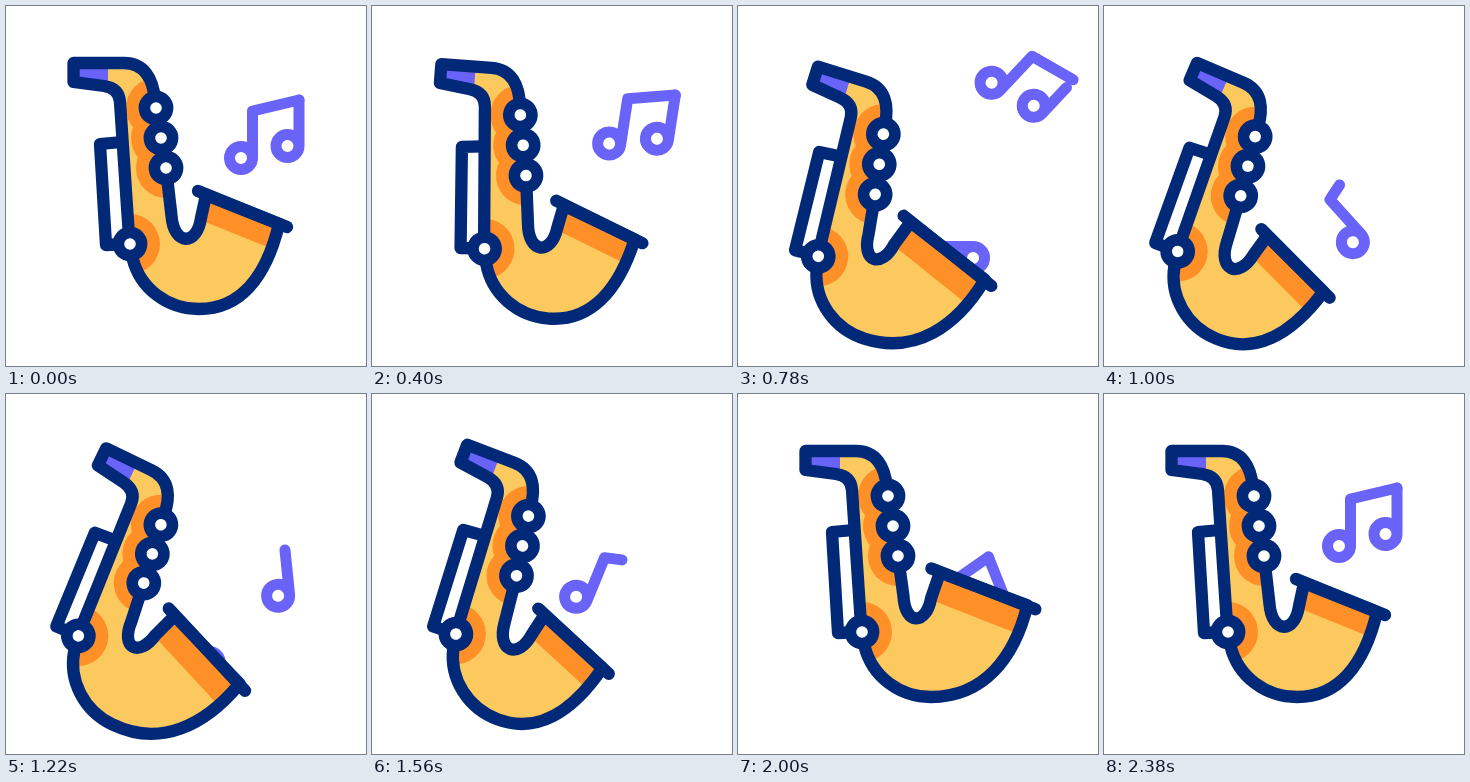
Recreate the animation shown at these times as an HTML page with a canvas. Size 360x360 px, loop 2.4 s.

```html
<!DOCTYPE html>
<html lang="en">
<head>
<meta charset="utf-8">
<title>Saxophone</title>
<style>
html, body { margin: 0; width: 100%; height: 100%; overflow: hidden; background: #fff; }
canvas { display: block; width: 360px; height: 360px; }
</style>
</head>
<body>
<canvas id="stage" width="360" height="360"></canvas>
<script>
const LOOP = 2400, LINE = 12.3;
const NAVY = '#022878', YELLOW = '#fcc95f', ORANGE = '#ff8f27', PURPLE = '#6a63f7';
const PIVOT = { x: 89.7, y: 127 };
const KEYS = [[150, 102], [155, 132], [160, 162], [124, 238]];
const ctx = document.getElementById('stage').getContext('2d');
const TAU = Math.PI * 2;

// Each single note passes through three poses: x, y, angle
const SINGLES = [
  { times: [780, 1220, 1400], poses: [[235, 252, -90], [272, 202, -6], [298, 160, 15]], fade: 1190 },
  { times: [1220, 1560, 1830], poses: [[203, 269, -110], [204, 203, 22], [270, 150, 50]], fade: 1600 }
];

const ramp = (t, a, b) => Math.min(1, Math.max(0, (t - a) / (b - a)));
const ease = (t, a, b) => (1 - Math.cos(Math.PI * ramp(t, a, b))) / 2;
const bump = (t, a, b) => Math.sin(Math.PI * ramp(t, a, b)) ** 2;

// Parabola through three moments
function parabola([a, b, c], [p, q, r], t) {
  return p * (t - b) * (t - c) / ((a - b) * (a - c))
       + q * (t - a) * (t - c) / ((b - a) * (b - c))
       + r * (t - a) * (t - b) / ((c - a) * (c - b));
}

// The bell swells as each note leaves it
const puff = t => Math.min(1, 1.15 * Math.max(
  ...[770, 1200, 1940].map(peak => bump(t, peak - 230, peak + 230))));

function place(x, y, angle) {
  ctx.translate(x, y);
  ctx.rotate(angle * Math.PI / 180);
}

function disc(x, y, r, color) {
  ctx.fillStyle = color;
  ctx.beginPath();
  ctx.arc(x, y, r, 0, TAU);
  ctx.fill();
}

function line(points, color, width) {
  ctx.strokeStyle = color;
  ctx.lineWidth = width;
  ctx.beginPath();
  points.forEach(([x, y]) => ctx.lineTo(x, y));
  ctx.stroke();
}

// Ring, stem and optional flag as one line that is shown up to a share
function note(x, y, stem, flagX, flagY, share) {
  if (share <= 0) return;
  const r = 11.5, length = TAU * r + stem + Math.hypot(flagX, flagY);
  ctx.beginPath();
  ctx.arc(x, y, r, 0, TAU);
  ctx.lineTo(x + r, y - stem);
  if (flagX) ctx.lineTo(x + r + flagX, y - stem + flagY);
  ctx.setLineDash(share < 1 ? [length * share, 999] : []);
  ctx.stroke();
  ctx.setLineDash([]);
}

function drawPair(t) {
  if (t < 1000) t += LOOP;
  if (t < 1880 || t > 3350) return;
  const below = 1 - ease(t, 1880, 2240);
  const away = Math.max(0, (t - 2600) / 580) ** 1.5;
  ctx.save();
  place(264 - 40 * below + 30.5 * away, 123 + 104 * below - 47.5 * away, -29 * below + 43 * away);
  note(-29, 29, 47, 46.5, -11, 1 - ramp(t, 3180, 3350));
  note(17.5, 17, 46, 0, 0, 1 - ramp(t, 3165, 3340));
  ctx.restore();
}

function drawSingle({ times, poses, fade }, t) {
  const end = times[2];
  if (t < times[0] - 40 || t > end) return;
  ctx.save();
  place(...[0, 1, 2].map(i => parabola(times, poses.map(pose => pose[i]), t)));
  note(0, 0, 47, 17, -4.5, 1 - ramp(t, fade, end));
  ctx.restore();
}

function outline(p) {
  const s = new Path2D();
  s.moveTo(67.5, 57);
  s.lineTo(118, 57);
  s.bezierCurveTo(138, 57, 147, 72, 149, 94);
  s.lineTo(160, 162);
  s.lineTo(165.5, 210 - 8 * p);
  s.bezierCurveTo(168 - p, 240 - 9 * p, 191 - 3 * p, 240 - 9 * p, 195 - 2 * p, 212 - 8 * p);
  s.lineTo(200 + 2 * p, 189 - 11 * p);
  s.lineTo(273 + 17 * p, 218 - 7 * p);
  s.bezierCurveTo(260 + 17 * p, 272 - 8 * p, 234 + 12 * p, 303, 193, 303);
  s.bezierCurveTo(162, 303, 134, 283, 126.5, 252);
  s.lineTo(123.5, 238);
  s.lineTo(114, 96);
  s.quadraticCurveTo(113, 82, 98, 80);
  s.lineTo(67.5, 76);
  s.closePath();
  return s;
}

function drawSax(t) {
  const p = puff(t), shape = outline(p);
  const rim = [[192 + 1.5 * p, 185 - 11 * p], [281 + 17 * p, 221 - 6 * p]];
  const dip = bump(t, 200, 1220), lift = bump(t, 1220, 1990);
  const lean = ease(t, 200, 1250) ** .75 - ease(t, 1380, 2000);
  ctx.save();
  place(PIVOT.x - 9.8 * dip + 1.5 * lift, PIVOT.y + 7.5 * dip - 3 * lift, 25.8 * lean);
  ctx.translate(-PIVOT.x, -PIVOT.y);

  line([[116, 136], [94, 138], [100, 239], [120, 238]], NAVY, LINE);

  ctx.save();
  ctx.clip(shape);
  ctx.fillStyle = YELLOW;
  ctx.fillRect(50, 40, 270, 280);
  ctx.fillStyle = PURPLE;
  ctx.fillRect(60, 50, 42, 40);
  KEYS.forEach(([x, y]) => disc(x, y, 30, ORANGE));
  ctx.lineCap = 'butt';
  line(rim, ORANGE, 52 + 7 * p);
  ctx.restore();

  ctx.strokeStyle = NAVY;
  ctx.lineWidth = LINE;
  ctx.stroke(shape);
  line(rim, NAVY, LINE);
  KEYS.forEach(([x, y]) => {
    disc(x, y, 17.4, NAVY);
    disc(x, y, 5.8, '#fff');
  });
  ctx.restore();
}

function frame(now) {
  const t = now % LOOP;
  ctx.clearRect(0, 0, 360, 360);
  ctx.lineCap = ctx.lineJoin = 'round';
  ctx.strokeStyle = PURPLE;
  ctx.lineWidth = 11;
  drawPair(t);
  SINGLES.forEach(single => drawSingle(single, t));
  drawSax(t);
  requestAnimationFrame(frame);
}
requestAnimationFrame(frame);
</script>
</body>
</html>
```
